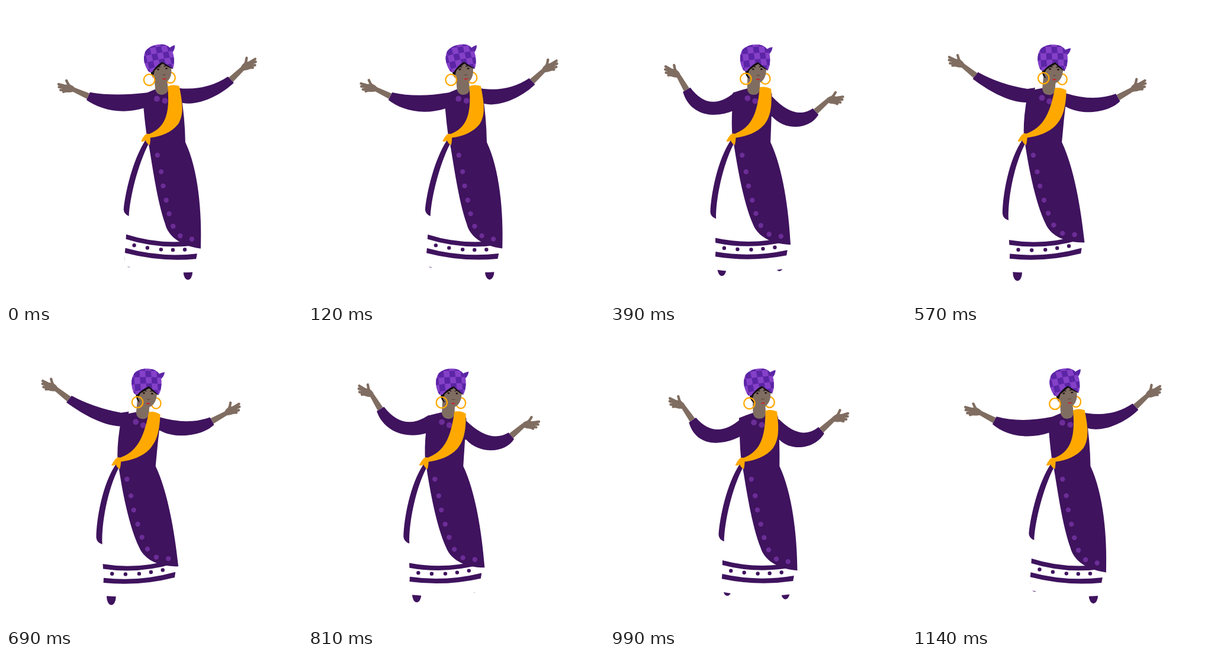
Animation, 500 px wide and 500 px high, one loop 1170 ms. Source, as an HTML page:

```html
<!DOCTYPE html>
<html lang="en">
<head>
<meta charset="utf-8">
<title>Dancer</title>
<style>
html, body { margin: 0; width: 100%; height: 100%; overflow: hidden; background: #fff; }
svg { display: block; width: 100vw; height: 100vh; }
</style>
</head>
<body>
<svg id="stage" viewBox="0 0 500 500"></svg>
<script>
const PERIOD = 1170, STEP = 30, LAG = 50;
const DARK = '#3f135e', BUTTON = '#6c2d97', SKIN = '#806d61', GOLD = '#ffa900', HAIR = '#120c12';
const stage = document.getElementById('stage');

function add(tag, attrs, parent = stage) {
  const el = document.createElementNS('http://www.w3.org/2000/svg', tag);
  set(el, attrs);
  parent.appendChild(el);
  return el;
}
function set(el, attrs) {
  for (const name in attrs) el.setAttribute(name, attrs[name]);
}

// Sideways sway of the body at each height: [y, reach]
const SWAY = [[100, 13], [140, 16.8], [160, 19], [180, 23], [195, 24.7], [225, 26], [255, 26.8], [285, 26.5],
  [330, 25], [352, 23.8], [372, 22.5], [390, 20.6], [415, 19], [460, 18]];

function reach(y) {
  if (y <= SWAY[0][0]) return SWAY[0][1];
  for (let i = 1; i < SWAY.length; i++) {
    const [y0, r0] = SWAY[i - 1], [y1, r1] = SWAY[i];
    if (y <= y1) return r0 + (r1 - r0) * (y - y0) / (y1 - y0);
  }
  return SWAY[SWAY.length - 1][1];
}
function tilt(y) {
  if (y < 225) return -0.12 * Math.min((225 - y) / 85, 1);
  return 0.083 * Math.min(Math.max((y - 250) / 145, 0), 1);
}
function warp(x, y, u) {
  return [x + u * reach(y), y + u * tilt(y) * (x - 245)];
}

const moving = [];
function shape(d, fill) {
  const el = add('path', { fill });
  moving.push(u => set(el, {
    d: d.replace(/(-?[\d.]+),(-?[\d.]+)/g, (m, x, y) =>
      warp(+x, +y, u).map(n => n.toFixed(2)).join())
  }));
}
function spots(list, r, fill) {
  for (const [x, y] of list) {
    const el = add('circle', { r, fill });
    moving.push(u => {
      const [cx, cy] = warp(x, y, u);
      set(el, { cx, cy });
    });
  }
}

function foot(x, dx, y, dy) {
  const el = add('ellipse', { rx: 7.8, ry: 14, fill: DARK });
  moving.push(u => set(el, { cx: x + dx * u, cy: y + dy * u - 14 }));
}

// Each pose gives the shoulder, armpit, cuff, bends and angles of one arm
function leftPose(u, q) {
  return {
    top: [215.7 + 22 * u, 147 + 3.5 * u - 4 * q],
    pit: [214 + 21 * u, 178 + 5 * u - 11 * q],
    cuff: [133.7 + 17 * u - 11.5 * q, 146 + 18.6 * u - 12 * q],
    sag: 20 - 17 * q,
    low: [11 + 10 * q, 38 - 24 * q],
    under: [-37 - 4 * u, 17 + 7 * u - 11 * q],
    arm: 58 - 7 * u - 28 * q,
    hand: 30 - 6 * u - 8 * q
  };
}
function rightPose(u, q) {
  return {
    top: [279 + 20 * u, 152 - 4 * u - 9 * q],
    pit: [279 + 20 * u, 186 - 3 * u - 20 * q],
    cuff: [351.5 + 16.5 * u + 12.8 * q, 174.5 - 15 * u - 36.5 * q],
    sag: 15 - 8.5 * q,
    low: [-15 - 4 * q, 26 - 8 * q],
    under: [21 + 8 * q, 23 - 5 * u - 12.5 * q],
    arm: 42 + q * (8 * u - 6),
    hand: 14 + 14 * u + q * (20 - 14 * u)
  };
}

function limb(side, pose) {
  const fore = add('path', { fill: SKIN });
  const hand = add('g', { stroke: SKIN, 'stroke-width': 4.3, 'stroke-linecap': 'round', fill: SKIN });
  add('path', { d: 'M-1 -3.4Q5 -7 11 -5Q18 -3 18 2Q17 8 10 7.5Q4 6.5 -1 3.4Z', 'stroke-width': 1 }, hand);
  add('path', { d: 'M11 -2L26 -1.5M11 0L24 3M10 3L20 7M8 4L14.5 8.5M6 -3Q11 -6 15 -11', fill: 'none' }, hand);
  const sleeve = add('path', { fill: DARK });
  moving.push((u, q) => {
    const p = pose(u, q);
    const a = p.arm * Math.PI / 180, c = Math.cos(a), s = Math.sin(a);
    const [x, y] = p.cuff;
    const wx = x + side * 28 * c, wy = y - 28 * s;
    const nx = -side * s, ny = -c;
    const up = [x + nx * 7.2, y + ny * 7.2], down = [x - nx * 7.2, y - ny * 7.2];
    const mix = i => p.top[i] + (up[i] - p.top[i]) * 0.56;
    const bend = [mix(0), mix(1) + 2 * p.sag];
    const low = [down[0] + p.low[0], down[1] + p.low[1]];
    const under = [p.pit[0] + p.under[0], p.pit[1] + p.under[1]];
    set(sleeve, {
      d: `M${p.top}Q${bend} ${up}L${down}C${low} ${under} ${p.pit}h${-side * 8}` +
        `L${p.top[0] - side * 13},${p.top[1] - 2}Z`
    });
    set(fore, {
      d: `M${x + nx * 5.2},${y + ny * 5.2}L${wx + nx * 3.8},${wy + ny * 3.8}` +
        `L${wx - nx * 3.8},${wy - ny * 3.8}L${x - nx * 5.2},${y - ny * 5.2}Z`
    });
    set(hand, { transform: `translate(${wx} ${wy}) scale(${side} 1) rotate(${-p.hand})` });
  });
}

function hoop(x, dx, y, dy, rx, ry) {
  const el = add('ellipse', { rx, ry, fill: 'none', stroke: GOLD, 'stroke-width': 2.3 });
  moving.push(u => set(el, { cx: 247.6 + x + (10.8 + dx) * u, cy: 88 + y + dy * u }));
}

function head() {
  const g = add('g', {});
  const part = (d, fill) => add('path', { d, fill }, g);
  const line = (d, stroke, w) =>
    add('path', { d, stroke, 'stroke-width': w, fill: 'none', 'stroke-linecap': 'round' }, g);
  part('M-17 16L-10 12L-9 35Q-15 32 -16 24Z', HAIR);
  part('M-13 14Q4 2 20 13L18.5 27Q16 38 8 42Q2 43 -4 38Q-11 33 -13 26Z', SKIN);
  part('M-16 21Q-6 12 5 3Q16 11 22.5 21Q13 17 5.5 9.8Q-3 15 -9 20L-12 27L-15 28Z', HAIR);
  line('M-7 16Q-3 13.5 1 15.2M7.5 15Q11 13.2 14 15', HAIR, 1.2);
  for (const x of [-3, 11]) {
    add('ellipse', { cx: x, cy: 18.8, rx: 2.4, ry: 1.5, fill: '#5a4038' }, g);
    add('circle', { cx: x, cy: 18.8, r: 1.2, fill: HAIR }, g);
  }
  line('M3.5 28.8Q6 30 8 28.6', '#574239', 1.1);
  part('M1.5 35.7Q5.5 34 9.5 35.5Q6 39 1.5 35.7Z', '#c3272d');

  const wrap = 'M-18.5 21.5C-25 13 -28 -4 -21 -14C-14 -22 0 -24.5 10 -22C20 -19.5 25.5 -10 25.5 0C25.5 8 25 15 22 20Q14 14 5 6.5Q-6 12 -14 22.5Z';
  const clip = add('clipPath', { id: 'wrap' }, g);
  add('path', { d: wrap }, clip);
  part('M17 -13Q21 -17 29.5 -19Q29 -11 23 -6Z', '#5b25a5');
  part(wrap, '#8540c8');
  const cloth = add('g', { 'clip-path': 'url(#wrap)', fill: '#5b25a5' }, g);
  const knot = (i, j) => [-34 + 9.6 * i + 1.6 * j, -28 + 10.5 * j + 0.12 * (i - 4) ** 2 * (j - 1) - i * 0.5];
  for (let i = 0; i < 7; i++) for (let j = 0; j < 6; j++) {
    if ((i + j) % 2) continue;
    const corners = [knot(i, j), knot(i + 1, j), knot(i + 1, j + 1), knot(i, j + 1)];
    add('polygon', { points: corners.join(' ') }, cloth);
  }
  moving.push(u => set(g, {
    transform: `translate(${247.6 + 10.8 * u} 88) rotate(${-1 - 5.5 * u})`
  }));
}

foot(193, 15.8, 453, -12);
foot(290.5, 17.5, 451, 12);
shape('M215,232L183,392L182,444Q244,454 306,444L304,392Z', '#fff');
shape('M183.2,390.6Q243,405 304,391L304,399Q243,412.5 183.2,398.6Z', DARK);
shape('M183.2,413.8Q243,425.6 304.5,413.4L303,422.5Q243,433 182.6,422Z', DARK);
spots([[197.8, 408], [220.3, 410.5], [243.3, 411.5], [263.3, 410.5], [283.3, 408.5]], 3.2, DARK);
shape('M211,226C188,260 177,318 175.5,347Q176,355 185,358.5C185,325 197,269 215.5,233Z', DARK);
limb(-1, leftPose);
limb(1, rightPose);
shape('M238,139Q224,143 212,147.5L212,172Q211,200 213.5,224L215.5,232C221,266 231,330 247,368' +
  'C253,386 273,402.5 310,404.5C308,345 299,275 277.7,230Q279,190 278,148L274,139Z', DARK);
shape('M236,118L236,141Q238,150 247,150Q256,150 257.5,141L257,118Z', SKIN);
spots([[237, 156], [250, 160.5]], 4.9, BUTTON);
spots([[230, 252], [236.5, 280], [240.5, 304], [246.5, 328], [252.5, 350.5], [260.5, 371],
  [274, 386], [294, 390]], 4.2, BUTTON);
shape('M257,137Q267,134 276.5,139C278.5,164 279,184 267,200C255,214 237,220 219,222.5' +
  'Q219,228 217.5,235Q212,232 210.5,227Q207,230 203,228.5Q206,222 210,217.5' +
  'Q214,214 217,216C243,206 255,186 257,137Z', GOLD);
hoop(18, 1.8, 34.5, -1.5, 8, 9);
head();
hoop(-15.6, -0.4, 35.4, 1.5, 9.2, 9.4);

function draw(time) {
  const t = Math.floor(time % PERIOD / STEP) * STEP;
  const u = Math.cos(2 * Math.PI * (t - LAG) / PERIOD);
  const q = u ** 6 * (4 - 3 * u * u);   // arms open wide only near both ends
  for (const move of moving) move(u, q);
}

let start = null;
function tick(now) {
  if (start === null) start = now;
  draw(now - start);
  requestAnimationFrame(tick);
}
draw(0);
requestAnimationFrame(tick);
</script>
</body>
</html>
```
